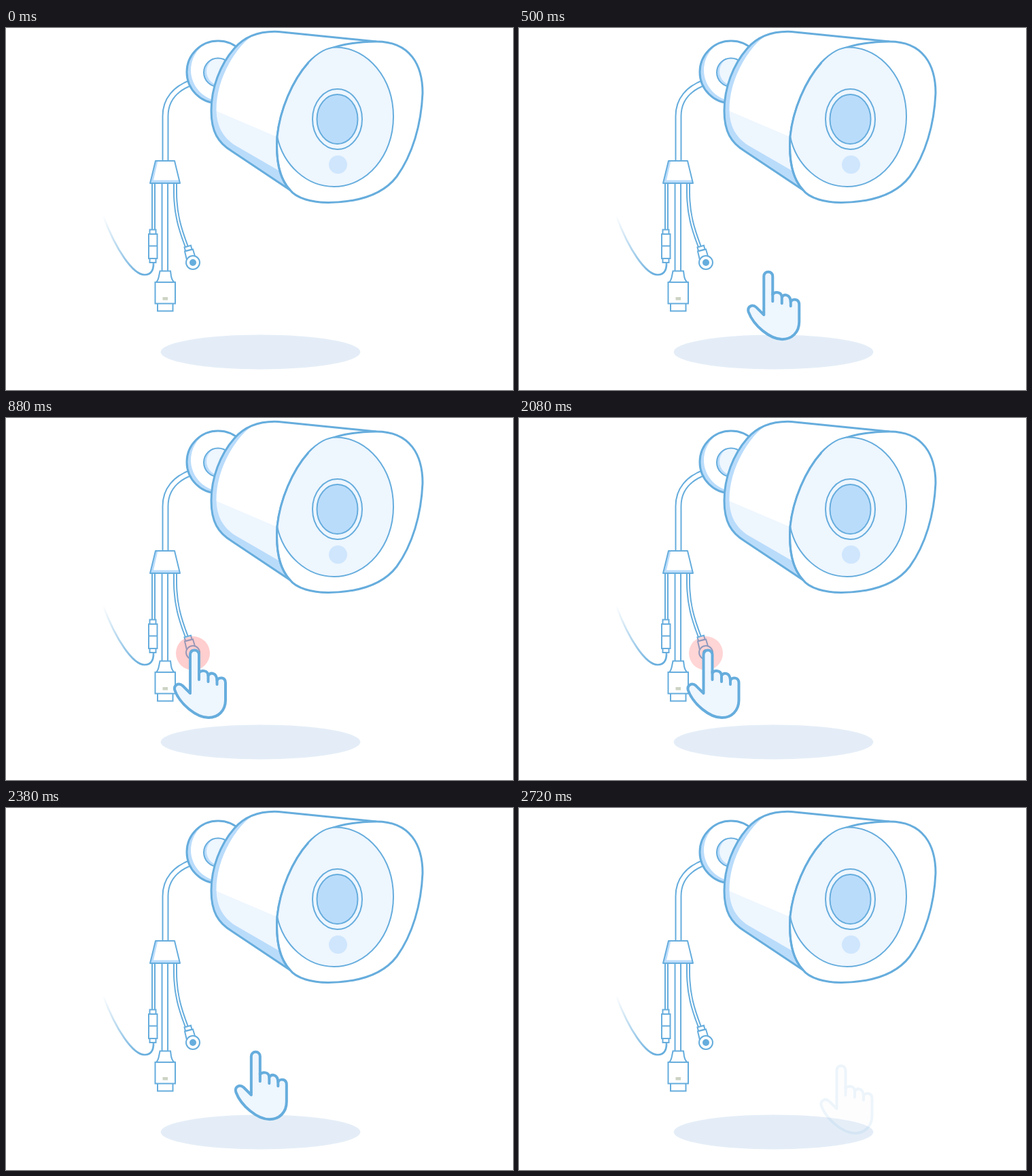
Write an HTML page that moves like this. It is 746 by 534 pixels and loops after 3200 ms.

```html
<!DOCTYPE html>
<html lang="en">
<head>
<meta charset="utf-8">
<title>Camera reset</title>
<style>
  html, body { margin: 0; width: 100%; height: 100%; overflow: hidden; background: #fff; }
  svg { display: block; width: 100vw; height: 100vh; }
  .line { stroke: #66addd; stroke-width: 2; fill: #fff; }
  .bold { stroke: #66addd; stroke-width: 3; }
  .none { fill: none; }
  .pale { fill: #eef6fe; }
  .blue { fill: #badcfb; }
  .wire { fill: none; stroke: #66addd; }
  .core { fill: none; stroke: #fff; }
</style>
</head>
<body>
<svg viewBox="0 0 746 534">
  <defs>
    <linearGradient id="tailFade" gradientUnits="userSpaceOnUse" x1="143" y1="277" x2="205" y2="364">
      <stop offset="0" stop-color="#66addd" stop-opacity="0"/>
      <stop offset="1" stop-color="#66addd"/>
    </linearGradient>
    <clipPath id="ballClip"><circle cx="312" cy="65" r="46"/></clipPath>
    <clipPath id="socketClip"><circle cx="312" cy="65.5" r="21"/></clipPath>
    <path id="body" d="M401 5.5C370 4 350 14 336 30C315 54 302 88 302 122C302 153 312 169 332 181.500L418 239L500 150L545 20Z"/>
    <clipPath id="bodyClip"><use href="#body"/></clipPath>
  </defs>

  <ellipse cx="374.500" cy="478" rx="147" ry="25.500" fill="#e4edf7"/>

  <g id="wires"></g>

  <!-- mount -->
  <g clip-path="url(#ballClip)">
    <circle class="blue" cx="312" cy="65" r="46"/>
    <circle cx="318" cy="62" r="46" fill="#fff"/>
  </g>
  <circle class="bold none" cx="312" cy="65" r="46"/>
  <g clip-path="url(#socketClip)">
    <circle class="blue" cx="312" cy="65.500" r="21"/>
    <circle class="pale" cx="316" cy="64" r="21"/>
  </g>
  <circle class="line none" style="fill:none" cx="312" cy="65.500" r="21"/>

  <!-- housing -->
  <use href="#body" fill="#fff"/>
  <g clip-path="url(#bodyClip)">
    <path class="pale" d="M306 121L402 162L420 240L312 160Z"/>
    <path class="blue" d="M378 4C353 14 342 30 329 51C316 74 309.500 98 309.500 121C310 145 319 161 337 173L406 213L420 245L290 190V0Z"/>
  </g>
  <path class="bold none" d="M418 239L332 181.500C312 169 302 153 302 122C302 88 315 54 336 30C350 14 370 4 401 5.500L545 20"/>
  <path id="rim" class="bold" fill="#fff" d="M418 239C401 221 397 191 399 160C403 121 421 78 445 51C465 29 503 20.500 545 20C595 20 613 55 613 96C611 143 598 187 575 219C553 248 516 257 474 257.500C450 257.500 427 251 418 239Z"/>
  <path class="line" style="fill:#eef6fe" d="M399 160C403 121 421 78 445 51C456 39 470 28.500 486 28.500C533 29 570 75 570 131C570 188 531 234 483 234C443 234 408 203 399 160Z"/>
  <path class="bold none" d="M418 239C401 221 397 191 399 160C403 121 421 78 445 51"/>
  <ellipse class="line" style="fill:#eef6fe" cx="487.500" cy="134.500" rx="36.500" ry="44.500"/>
  <ellipse class="line" style="fill:#badcfb" cx="487.500" cy="134.500" rx="30" ry="36.500"/>
  <circle cx="488.500" cy="201.500" r="13.500" fill="#cfe6fd"/>

  <!-- splitter -->
  <path d="M220 196H248L256 229H212Z" fill="#fff"/>
  <path class="blue" d="M220 196H223.500L217 224.500H255L256 229H212Z"/>
  <path class="line none" style="fill:none" stroke-linejoin="round" d="M220 196H248L256 229H212Z"/>

  <!-- plugs -->
  <path fill="none" stroke="url(#tailFade)" stroke-width="2.700" d="M217 346C217.500 359 212 364 204 364C187 364 162 328 143 277"/>
  <g class="line">
    <path d="M211.500 297.500H220.500V304H211.500ZM210 304H222.500V321.500H210ZM210 321.500H222.500V340H210ZM211.500 340H220.500V346H211.500Z"/>
    <path d="M226.500 358.500H242L243 366Q244 372 247.500 375H221Q224 372 225 366Z"/>
    <path d="M219.500 375H249V406.500H219.500ZM223 406.500H245.500V417.500H223Z"/>
    <path d="M262.500 323.500L272 320.800L273.500 326.500L264 329ZM263 329.500L275 326.500L279 340L266 342Z"/>
    <circle cx="275" cy="346" r="10"/>
  </g>
  <rect x="230.500" y="397" width="7.500" height="4.500" fill="#ccd3c3"/>
  <circle cx="275" cy="346" r="5" fill="#66addd"/>

  <circle id="press" cx="275" cy="347" r="25" fill="#ff6a6a" fill-opacity=".33"/>
  <g id="hand" stroke="#66addd" stroke-width="4" stroke-linecap="round" stroke-linejoin="round">
    <path class="pale" d="M271 406V349a6.500 6.500 0 0 1 13 0V376C287 371.500 297 371.500 297.500 380C301 374.500 310 375.500 310.500 387C313 381.500 323 382 323 391V416C323 432 312 442 298 442C280 442 256 422 248.500 402C246 394 254 389.500 260 395Z"/>
    <path fill="none" d="M284 374V386M297.500 380V389M310.500 386V393"/>
  </g>
</svg>
<script>
  const LOOP = 3200, STEP = 20, LAST_CHANGE = 2720;
  const AWAY = { x: 197, y: 37.8 };
  const byId = id => document.getElementById(id);
  const hand = byId('hand'), press = byId('press');

  // Each cable is a blue stroke with a narrower white one on top.
  const cables = [
    ['M274 80C249 89 234.500 106 234.500 130V196', 10, 6],
    ['M217 229V298', 6, 2],
    ['M233.800 229V359', 10.5, 6.5],
    ['M249 229V242C249 274 256 297 266 323', 6, 2]
  ];
  byId('wires').innerHTML = cables.map(([d, outer, inner]) =>
    `<path class="wire" stroke-width="${outer}" d="${d}"/>` +
    `<path class="core" stroke-width="${inner}" d="${d}"/>`).join('');

  const ramp = (t, from, to) => Math.min(1, Math.max(0, (t - from) / (to - from)));
  const smooth = u => u * u * (3 - 2 * u);

  function draw(time) {
    const t = Math.min(LAST_CHANGE, Math.floor(time % LOOP / STEP) * STEP);
    const away = 1 - smooth(ramp(t, 160, 800)) + smooth(ramp(t, 2060, 2740));
    hand.setAttribute('transform', `translate(${AWAY.x * away} ${AWAY.y * away})`);
    hand.setAttribute('opacity', ramp(t, 100, 260) - ramp(t, 2560, 2740));
    press.setAttribute('opacity', ramp(t, 700, 880) - ramp(t, 2060, 2200));
  }

  let start;
  function tick(now) {
    start ??= now;
    draw(now - start);
    requestAnimationFrame(tick);
  }
  draw(0);
  requestAnimationFrame(tick);
</script>
</body>
</html>
```
